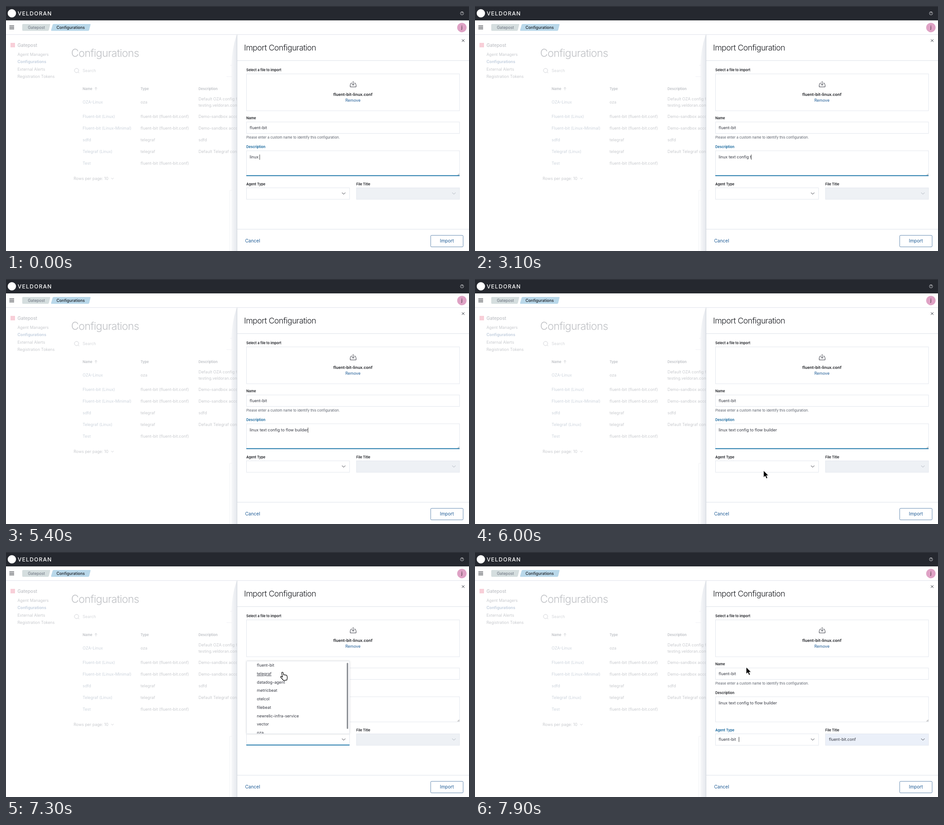
Write an HTML page that moves like this. It is 1027 px wide and 545 px high and loops after 8000 ms.

```html
<!DOCTYPE html>
<html lang="en">
<head>
<meta charset="utf-8">
<title>Import Configuration</title>
<style>
  html, body { margin: 0; height: 100%; overflow: hidden; background: #fff; }
  svg { display: block; width: 100vw; height: 100vh; }
  text { font: 400 8.9px Inter, sans-serif; fill: #343741; white-space: pre; }
  .label { font-size: 7.6px; font-weight: 600; fill: #1a1c21; }
  .small { font-size: 7.64px; fill: #5a606b; }
  .big { font-size: 10.1px; fill: #1f5c96; }
  .link { fill: #1f5c96; }
  .mid { text-anchor: middle; }
  .faded text { fill: #c8cace; }
  .faded .link { fill: #ccd3dc; }
  .faded .head { font-size: 7.6px; font-weight: 600; fill: #bcbfc4; }
  .line { fill: none; stroke: #343741; stroke-linecap: round; stroke-linejoin: round; }
  .field { fill: #fff; stroke: #e3e7ee; }
  .bar { stroke: #0d6ea4; stroke-width: 1.6; }
  .caret { stroke: #111; stroke-width: .8; }
</style>
</head>
<body>
<svg viewBox="0 0 1027 545">
  <defs>
    <linearGradient id="shade"><stop stop-color="#f7f8fa"/><stop offset="1" stop-color="#e6e9ee"/></linearGradient>
    <clipPath id="listClip"><rect x="533" y="243" width="229" height="161"/></clipPath>
    <filter id="soft" x="-20%" y="-20%" width="140%" height="140%"><feDropShadow dx="0" dy="0" stdDeviation="2" flood-opacity=".1"/></filter>
  </defs>

  <g class="faded" id="page">
    <path d="M512 64V545H500V130Q502 90 512 64Z" fill="url(#shade)"/>
    <path d="M496.500 545V410H502M489 157H502M497 132H502" fill="none" stroke="#f0f1f4"/>
    <rect x="10" y="82" width="10" height="10" fill="#f8cfd8"/>
    <text x="25.500" y="90.600" style="font-size:10.1px;font-weight:500;fill:#bfc1c6">Gatepost</text>
    <text x="144.500" y="113" style="font-size:23.500px;font-weight:300;letter-spacing:-.03em;fill:#bfc1c5">Configurations</text>
    <path class="line" d="M160.500 147.500L162 149" style="stroke:#c9ccd1"/>
    <circle cx="156.500" cy="143.500" r="4.700" fill="none" stroke="#c9ccd1" stroke-width=".9"/>
    <path class="line" d="M199.500 187V181M197 183.500L199.500 181L202 183.500M233.500 382.800L236 385.200L238.500 382.800" style="stroke:#c4c7cc;stroke-width:.8"/>
  </g>

  <rect width="1027" height="32" fill="#25282f"/>
  <rect width="1027" height="1" fill="#3a3d45"/>
  <circle cx="13" cy="16.300" r="9.200" fill="#fff"/>
  <text x="26" y="20.600" style="font-size:12px;font-weight:500;letter-spacing:1.3px;fill:#fff">VELDORAN</text>
  <circle cx="1011.500" cy="16.300" r="3.600" fill="none" stroke="#e6e8ec" stroke-width=".8"/>
  <text class="mid" x="1011.500" y="18.300" style="font-size:5.500px;font-weight:600;fill:#fff">?</text>
  <path d="M0 63.500H1027" stroke="#dfe3ea"/>
  <path d="M7.500 44.300H18M7.500 47.600H18M7.500 50.900H18" stroke="#25282f" stroke-width="1.300"/>
  <path d="M38 40H97Q98.500 40 98 41.500L95 53.500Q94.500 55.300 92.500 55.300H38Q36 55.300 36 53.300V42Q36 40 38 40Z" fill="#d5dedf"/>
  <path d="M106 40H186.500Q188 40 187.500 41.500L184.500 53.500Q184 55.300 182 55.300H101.500Q99.500 55.300 100 53.500L103.500 41.500Q104 40 106 40Z" fill="#b9d8ea"/>
  <text x="48.500" y="51" style="fill:#69707d">Gatepost</text>
  <text x="112" y="51" style="font-weight:500;fill:#1a1c21">Configurations</text>
  <circle cx="1011.200" cy="47.900" r="10.500" fill="#dfa2c5"/>
  <text class="mid" x="1011.200" y="51" style="font-size:9.500px;fill:#111">j</text>

  <g id="panel">
    <rect x="512.500" y="64" width="515" height="482" fill="#fff"/>
    <path d="M512.500 64V545" stroke="#cfd4dc"/>
    <path d="M513 121.500H1027M513 496.500H1027" stroke="#dde2e9"/>
    <path class="line" d="M1011.400 74.300L1016.600 79.500M1016.600 74.300L1011.400 79.500"/>
    <text x="528" y="98.500" style="font-size:17.800px;font-weight:350;letter-spacing:-.03em;fill:#1a1c21">Import Configuration</text>
    <rect class="field" x="533.500" y="151" width="472.500" height="82"/>
    <path class="line" d="M767 171.500H765.300L763.500 175.500V180H776.500V175.500L774.700 171.500H773M770 167.500V176M767.300 173.600L770 176.300L772.700 173.600"/>
    <rect class="field" x="533.500" y="258" width="472.500" height="25.500"/>
    <rect class="field" x="533.500" y="322" width="472.500" height="56"/>
    <path d="M1001.500 377L1005.500 373M1003.800 377L1005.500 375.300" stroke="#555" stroke-width=".7"/>
    <rect class="field" x="533.500" y="404.500" width="228.500" height="25.500"/>
    <rect class="field" id="fileBox" x="777.500" y="404.500" width="228.500" height="25.500"/>
    <path class="line" d="M745.500 415.300L749 418.800L752.500 415.300"/>
    <path class="line" id="fileArrow" d="M990 415.300L993.500 418.800L997 415.300"/>
    <rect x="942" y="510.200" width="72" height="25.600" rx="2" fill="#fff" stroke="#6389b0"/>
  </g>

  <path id="noteBar" class="bar" d="M533 377.400H1006"/>
  <text id="note" x="540.500" y="339.300"></text>
  <path id="noteCaret" class="caret" d="M0 330.500V342"/>
  <path id="agentBar" class="bar" d="M533 429.400H762"/>
  <path id="agentCaret" class="caret" d="M0 411.500V422.500"/>
  <g id="chosen">
    <text x="540.500" y="420">fluent-bit</text>
    <text x="785" y="420">fluent-bit.conf</text>
  </g>

  <g id="list">
    <rect x="533.500" y="242.500" width="228.500" height="162" rx="1" fill="#fff" stroke="#dde1e8" filter="url(#soft)"/>
    <g id="options" clip-path="url(#listClip)"></g>
    <rect x="755.800" y="246.500" width="3.200" height="147" rx="1.500" fill="#8f9298"/>
  </g>

  <path id="arrow" d="M0 0V15.500L3.700 12.200L6.200 18L9 16.800L6.500 11.200H11Z" fill="#000" stroke="#fff" stroke-width="1"/>
  <path id="hand" d="M-1.500 1.500Q-1.500 0 0 0T1.700 1.500L3 6.300Q4 5.300 5.400 6.300Q6.800 5.500 7.800 6.700Q9.800 6.200 10.300 8.500L11 12L10 17.500L2.500 18.500Q-.5 14.500-3.700 11.500Q-4.500 9.500-2.300 9.300L.3 11Z" fill="#fff" stroke="#000" stroke-width="1.200" stroke-linejoin="round"/>
</svg>
<script>
const $ = id => document.getElementById(id);
const show = (id, on) => $(id).style.display = on ? '' : 'none';

function addText(parent, x, mid, str, cls = '') {
  const el = document.createElementNS('http://www.w3.org/2000/svg', 'text');
  el.setAttribute('x', x);
  el.setAttribute('y', mid + (/label|small|head/.test(cls) ? 2.8 : 3.3));
  el.setAttribute('class', cls);
  el.textContent = str;
  parent.append(el);
  return el;
}

const page = $('page'), panel = $('panel');
['Agent Managers', 'Configurations', 'External Alerts', 'Registration Tokens'].forEach((s, i) => {
  const el = addText(page, 25.5, 108 + 16.1 * i, s);
  if (i === 1) el.style.cssText = 'font-weight:600;fill:#c0cddd';
});
addText(page, 170, 144, 'Search').style.fill = '#d5d7db';
addText(page, 170, 184, 'Name', 'head');
addText(page, 298.5, 184, 'Type', 'head');
addText(page, 427, 184, 'Description', 'head');
const bit = 'fluent-bit (fluent-bit.conf)';
[
  [214, 'OZA-Linux', 'oza', ''],
  [246, 'Fluent-bit (Linux)', bit, 'Demo-sandbox account'],
  [272, 'Fluent-bit (Linux-Minimal)', bit, 'Demo-sandbox account'],
  [298, 'sdfd', 'telegraf', 'sdfd'],
  [324, 'Telegraf (Linux)', 'telegraf', 'Default Telegraf config'],
  [350, 'Test', bit, '']
].forEach(([y, name, type, about]) => {
  addText(page, 170, y, name, 'link');
  addText(page, 298.5, y, type);
  addText(page, 427, y, about);
});
addText(page, 427, 207, 'Default OZA config for');
addText(page, 427, 220.5, 'testing.veldoran.com');
addText(page, 150, 384, 'Rows per page: 10');

addText(panel, 533, 142.5, 'Select a file to import', 'label');
addText(panel, 769.5, 197, 'fluent-bit-linux.conf', 'mid').style.cssText = 'font-weight:600;fill:#1a1c21';
addText(panel, 769.5, 210, 'Remove', 'mid link');
addText(panel, 533, 249.5, 'Name', 'label');
addText(panel, 540.5, 270.3, 'fluent-bit');
addText(panel, 533, 291.7, 'Please enter a custom name to identify this configuration.', 'small');
const noteLabel = addText(panel, 533, 313.5, 'Description', 'label');
const agentLabel = addText(panel, 533, 395.7, 'Agent Type', 'label');
addText(panel, 777, 395.7, 'File Title', 'label');
addText(panel, 530.5, 522.9, 'Cancel', 'big');
addText(panel, 978, 522.9, 'Import', 'big mid');

const rowY = i => 252 + 18.7 * i;
const options = ['fluent-bit', 'telegraf', 'datadog-agent', 'metricbeat', 'otelcol', 'filebeat',
  'newrelic-infra-service', 'vector', 'oza'].map((s, i) => addText($('options'), 556.5, rowY(i), s));

// [time, characters typed so far]
const phrase = 'linux text config to flow builder';
const keys = [[-400, 6], [400, 7], [500, 8], [800, 9], [1000, 10], [1200, 11], [1700, 12], [1800, 13],
  [1900, 14], [2000, 15], [2200, 16], [2300, 17], [2900, 18], [3100, 19], [3200, 20], [3300, 21],
  [3900, 23], [4200, 25], [4300, 26], [4500, 27], [4700, 28], [4900, 29], [5100, 30], [5200, 31],
  [5300, 32], [5400, 33]];

// [time, x, y] of the pointer tip
const path = [[5600, 660, 478], [5800, 650, 447], [6000, 640, 426], [6200, 643, 423], [6400, 649, 418],
  [6900, 650, 416], [7000, 648, 392], [7100, 638, 340], [7200, 623, 290], [7300, 613, 267.3],
  [7500, 607, 262], [7700, 601.5, 256]];

function pointerAt(t) {
  const i = path.findIndex(p => p[0] > t);
  if (i < 0) return path[path.length - 1].slice(1);
  const [a, b] = [path[Math.max(i - 1, 0)], path[i]];
  const k = Math.max(0, (t - a[0]) / (b[0] - a[0]));
  return [a[1] + (b[1] - a[1]) * k, a[2] + (b[2] - a[2]) * k];
}

const blink = (t, since) => Math.floor((t - since) / 500) % 2 === 0;
const moveCaret = (id, x) => $(id).setAttribute('transform', `translate(${x})`);
const blue = '#0d6098', black = '#1a1c21';

function draw(t) {
  const focusAgent = t >= 6400, done = t >= 7800, closed = t >= 7900;
  const [since, count] = keys.filter(k => k[0] <= t).pop();
  const note = $('note');
  note.textContent = phrase.slice(0, count);
  moveCaret('noteCaret', 540.6 + note.getComputedTextLength());
  show('noteCaret', !focusAgent && blink(t, since));
  show('noteBar', !focusAgent);
  noteLabel.style.fill = focusAgent ? black : blue;
  agentLabel.style.fill = !focusAgent ? black : t < 6600 ? '#17456d' : blue;

  show('agentBar', t >= 6600 && !done);
  moveCaret('agentCaret', done ? 585.5 : 541.5);
  show('agentCaret', t >= 6600 && blink(t, done ? 7800 : 6600));
  show('chosen', done);
  $('fileBox').style.fill = done ? '#ebf0f9' : '#eef1f5';
  $('fileArrow').style.stroke = done ? '#343741' : '#a9b0bb';

  show('list', t >= 6600 && !closed);
  $('list').style.opacity = t < 6700 || done ? .5 : 1;
  $('list').setAttribute('transform', `translate(0 ${done ? -10 : 0})`);

  const [x, y] = pointerAt(t);
  const onList = t >= 6900 && !done && y < 404;
  options.forEach((el, i) =>
    el.style.textDecoration = onList && Math.abs(y + 2 - rowY(i)) < 9.35 ? 'underline' : 'none');
  show('arrow', t >= 5600 && !onList);
  show('hand', onList);
  for (const id of ['arrow', 'hand']) $(id).setAttribute('transform', `translate(${x} ${y})`);
}

function tick() {
  draw(Math.floor(performance.now() % 8000 / 100) * 100);
  requestAnimationFrame(tick);
}
tick();
</script>
</body>
</html>
```
